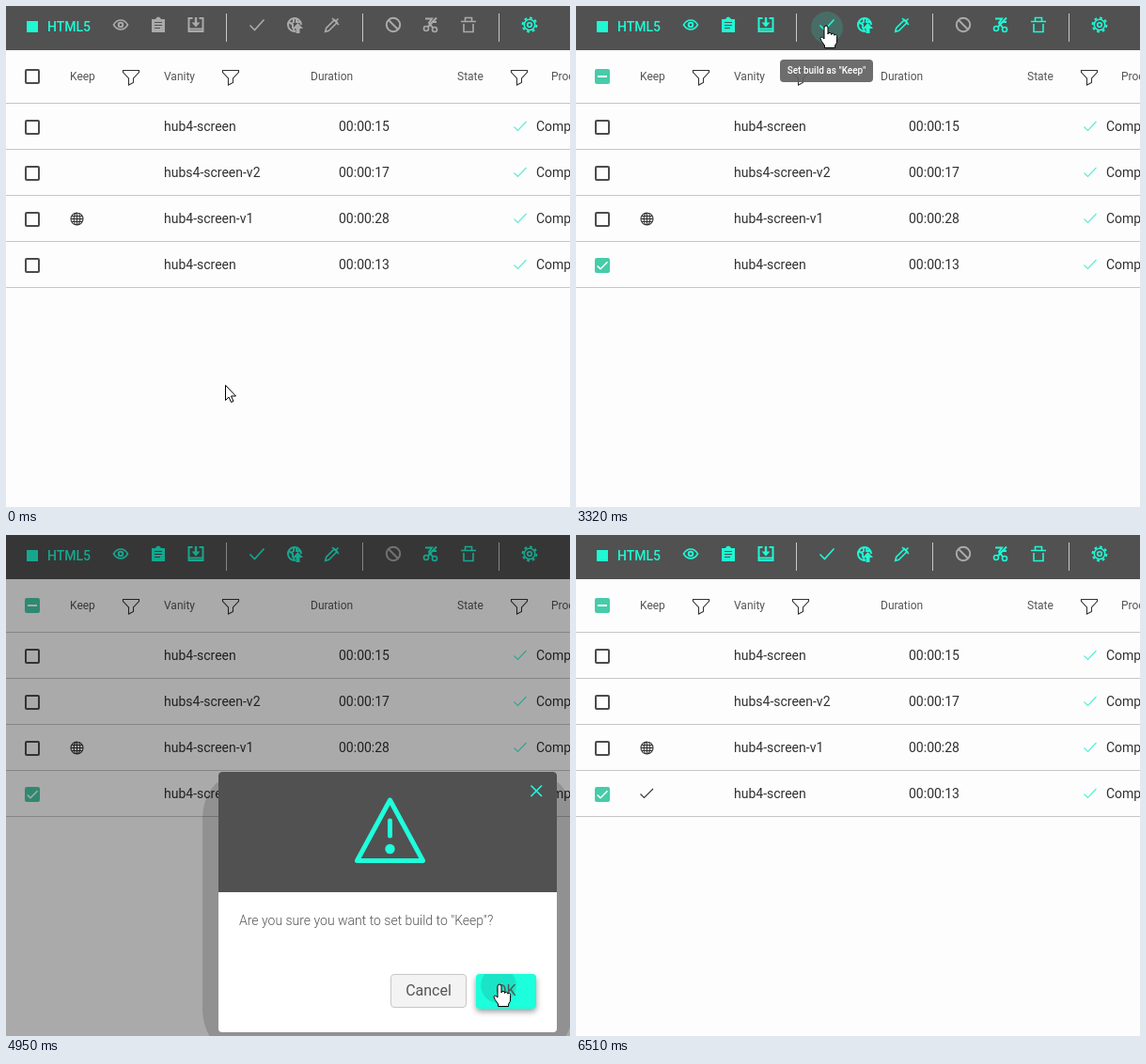
Write an HTML page that moves like this. It is 600 px wide and 533 px high and loops after 6.81 s.

```html
<!DOCTYPE html>
<html lang="en">
<head>
<meta charset="utf-8">
<title>Build list</title>
<style>
  html, body { margin: 0; width: 100%; height: 100%; overflow: hidden; background: #fdfdfd; }
  svg { display: block; font-family: Roboto, Arial, sans-serif; --teal: #1ff8d4; --tool: #aaa; }
  .icon { color: var(--teal); }
  .tool { color: var(--tool); }
  .off { color: #aaa; }
  .icon path, .icon circle { fill: none; stroke: currentColor; stroke-width: 2; }
  .icon .solid { fill: currentColor; stroke: none; }
  .icon .fine { stroke-width: 1.6; }
  .icon .bold { stroke-width: 5; stroke-linejoin: round; stroke-linecap: round; }
  .head { font-size: 12px; fill: #555; }
  .cell { font-size: 14px; fill: #303030; }
  .box { fill: #fff0; stroke: #4c4c4c; stroke-width: 2; }
  .hover { fill: #cdf4ec; stroke: #4b6862; }
  .checked { fill: #46cca8; stroke: #46cca8; }
  .thin { fill: none; stroke: #333; stroke-width: 1.1; }
  .rule { stroke: #c6c6c6; }
  .button { font-size: 16px; fill: #555; text-anchor: middle; }
</style>
</head>
<body>
<svg id="stage" width="600" height="533" viewBox="0 0 600 533">
  <rect width="600" height="533" fill="#fdfdfd"/>
  <rect width="600" height="47" fill="#515151"/>
  <path d="M234.5 8V38M379.5 8V38M524.5 8V38" stroke="#c8c8c8"/>
  <circle id="ripple" cx="267" cy="23" fill="#1ff8d4" opacity=".17"/>

  <rect x="22" y="16" width="12" height="12" fill="var(--teal)"/>
  <text x="44" y="27" font-size="14" font-weight="500" fill="var(--teal)">HTML5</text>

  <g class="icon tool">
    <g transform="translate(122 20)">
      <path class="fine" d="M-7.5 0Q-4.5 -5 0 -5T7.5 0Q4.5 5 0 5T-7.5 0Z"/>
      <circle r="2.3"/>
    </g>
    <path class="solid" transform="translate(162 20)" fill-rule="evenodd"
      d="M-7 -6H-3Q-2 -8.5 0 -8.5T3 -6H7V8H-7ZM-4 -3V-2H4V-3ZM-4 0V1H4V0ZM-4 3V4H2V3Z"/>
    <g transform="translate(202 20)">
      <path d="M-3.5 -7H-7.5V7H7.5V-7H3.5M-7 4.5H7"/>
      <path class="solid" d="M-1.2 -8H1.2V-2.5H4.5L0 2.5L-4.5 -2.5H-1.2Z"/>
    </g>
    <path class="fine" d="M259.5 20.5L264.5 25.5L274.5 14.5"/>
    <g transform="translate(307 20)">
      <path d="M1 7A7 7 0 1 1 7 0M-6 -3L-2 0V3L0 6M-1 -6V-3L-4 -1M2 -6V-3H6"/>
      <path class="solid" d="M3.5 -2L9 4H5.5V9H1.5V4H-2Z"/>
    </g>
    <path class="fine" transform="translate(347 20)"
      d="M-7.3 7.3L-6.3 3.5L2.5 -5.3L5.3 -2.5L-3.5 6.3ZM0 -7L7 0M4 -4L6.5 -6.5"/>
    <g transform="translate(451 20)">
      <circle class="fine" cx="-4" cy="4" r="2.5"/>
      <circle class="fine" cx="5" cy="5" r="2.5"/>
      <path d="M7 -7.5L-2 2M-5 -6.5H2L-1 -2L3 3M2 -3H7"/>
    </g>
    <path class="fine" transform="translate(492 20)"
      d="M-8 -3.5H8M-3.5 -4V-7.5H3.5V-4M-5 -1V7.5H5V-1"/>
  </g>
  <g class="icon off" transform="translate(412 20)">
    <circle r="7.2"/><path d="M-5 -5L5 5"/>
  </g>
  <g class="icon" transform="translate(557 20)">
    <circle class="fine" r="5.7"/>
    <circle r="7.4" pathLength="16" stroke-dasharray="1"/>
    <circle class="fine" r="2.3"/>
  </g>

  <g id="heads"></g>
  <path class="rule" d="M0 103.5H600"/>
  <rect class="box" id="allBox" x="21" y="68" width="14" height="14" rx="1"/>
  <path id="allBar" d="M23 75H33" stroke="#fff" stroke-width="2"/>
  <g id="rows"></g>
  <path class="thin" transform="translate(75.5 226.5)"
    d="M0 -6.5A6.5 6.5 0 0 1 0 6.5A6.5 6.5 0 0 1 0 -6.5A3.3 6.5 0 0 1 0 6.5A3.3 6.5 0 0 1 0 -6.5V6.5M-6.5 0H6.5M-5.5 -3H5.5M-5.5 3H5.5"/>
  <path id="tick" d="M22.7 276.5L26 279.7L33.5 272.2" fill="none" stroke="#fff" stroke-width="1.5"/>
  <path id="kept" class="thin" d="M68.5 275.5L72.5 279.5L82 270"/>

  <g id="tip">
    <rect x="217" y="57" width="99" height="24" rx="4" fill="#616161" fill-opacity=".92"/>
    <text x="266.5" y="72" font-size="10" font-weight="500" fill="#fff" text-anchor="middle">Set build as "Keep"</text>
  </g>

  <rect id="dim" width="600" height="533"/>
  <g id="dialog">
    <rect id="shade" y="258" height="290" rx="30" ry="44" fill-opacity=".15"/>
    <rect x="226" y="252" width="360" height="277" rx="4" fill="#fff"/>
    <path d="M226 380V256Q226 252 230 252H582Q586 252 586 256V380Z" fill="#515151"/>
    <g class="icon" style="--teal:#1fffdc">
      <path class="fine" d="M558.5 266.5L570 278M570 266.5L558.5 278"/>
      <path class="bold" d="M408.5 282L443.5 346.5H373.5ZM408.5 304V320"/>
      <circle class="solid" cx="408.5" cy="334" r="5.2"/>
    </g>
    <text x="248" y="415" font-size="14" font-weight="300" fill="#555">Are you sure you want to set build to "Keep"?</text>
    <rect id="cancel" x="409.5" y="467.5" width="80" height="35" rx="3.5" stroke="#c8c8c8"/>
    <text class="button" x="449.5" y="490">Cancel</text>
    <rect id="ok" x="500" y="467" width="64" height="37" rx="4"/>
    <clipPath id="okClip"><rect x="500" y="467" width="64" height="37" rx="4"/></clipPath>
    <circle id="okRipple" cx="524" cy="479" r="19" fill-opacity=".1" clip-path="url(#okClip)"/>
    <text class="button" x="532" y="490">OK</text>
  </g>

  <g id="cursor" fill="#fff" stroke="#000" stroke-linejoin="round">
    <path id="arrow" d="M.5 .5V16.5L4 13L6.5 18.5L9 17.5L6.5 12H11.5Z"/>
    <path id="hand" d="M-2 14V2a2 2 0 0 1 4 0V9q0-2 2-1.6t1.6 2.1q0-1.6 1.8-1.2t1.6 2q0-1.3 1.5-.8t1.1 2.2V16q0 3-2 5v2.5H-1.5V21Q-5.5 16-6 13.5q.5-3 4 .5z"/>
  </g>
</svg>
<script>
const LOOP = 6810;
const $ = id => document.getElementById(id);
const show = (id, on) => $(id).style.display = on ? "" : "none";
const set = (id, attrs) => Object.entries(attrs).forEach(([k, v]) => $(id).setAttribute(k, v));

const heads = { Keep: 68, Vanity: 168, Duration: 324, State: 480, Processing: 580 };
const funnel = x => `<path class="thin" transform="translate(${x} 76)"
  d="M-8.5 -7.5H8.5V-5.5L2.5 1V5.5L-2.5 8V1L-8.5 -5.5Z"/>`;
$("heads").innerHTML = Object.entries(heads)
  .map(([label, x]) => `<text class="head" x="${x}" y="79">${label}</text>`)
  .concat([133, 239, 546].map(funnel)).join("");

const builds = [["hub4-screen", 15], ["hubs4-screen-v2", 17], ["hub4-screen-v1", 28], ["hub4-screen", 13]];
$("rows").innerHTML = builds.map(([name, secs], i) => `
  <g transform="translate(0 ${i * 49})">
    <rect class="box" id="box${i}" x="21" y="122" width="14" height="14" rx="1"/>
    <text class="cell" x="168" y="133">${name}</text>
    <text class="cell" x="354" y="133">00:00:${secs}</text>
    <path class="thin" d="M540.5 128.5L544.5 132.5L553.5 123" style="stroke:#54eed4"/>
    <text class="cell" x="564" y="133">Completed</text>
    <path class="rule" d="M0 152.5H600"/>
  </g>`).join("");

// Pointer strokes: first and last step in ms, then the point reached.
const strokes = [
  [380, 660, 137, 342], [800, 1280, 34, 274], [2100, 2220, 95, 251], [2360, 2890, 266, 21],
  [4040, 4400, 474, 440], [4550, 4800, 525, 478], [6120, 6360, 577, 524]
];

// The pointer advances in even steps of about 125 ms.
function pointer(t) {
  let x = 233, y = 403;
  for (const [first, last, toX, toY] of strokes) {
    if (t < first) break;
    const gaps = Math.round((last - first) / 125);
    const step = Math.min(gaps, Math.floor((t - first) / (last - first) * gaps));
    const p = (step + 1) / (gaps + 1);
    x += (toX - x) * p;
    y += (toY - y) * p;
  }
  return [x, y];
}

const within = (t, a, b) => t >= a && t < b;

// Approaches `to` in hard steps of 150 ms.
const settle = (t, start, from, to) => to + (from - to) * .15 ** Math.max(0, Math.floor((t - start) / 150));

function draw(t) {
  const picked = t >= 1580, checked = t >= 1700, pressed = t >= 4950;
  const open = within(t, 3470, 5100);
  const hand = within(t, 1280, 2100) || within(t, 2730, 3470) || within(t, 4800, 5100);

  set("cursor", { transform: `translate(${pointer(t)})` });
  show("cursor", t < 6510);
  show("hand", hand);
  show("arrow", !hand);

  $("stage").style.setProperty("--tool", picked ? "var(--teal)" : "#aaa");
  set("box3", { class: "box " + (checked ? "checked" : picked ? "hover" : "") });
  set("allBox", { class: "box " + (checked ? "checked" : "") });
  show("allBar", checked);
  show("tick", checked);
  set("tick", { "stroke-dasharray": `${t < 1850 ? 8 : 20} 40` });
  show("kept", t >= 5530);

  show("ripple", within(t, 3320, 3620) || within(t, 5100, 5380));
  set("ripple", { r: settle(t, 3320, 17, 20) });
  show("tip", within(t, 2730, 3470));
  set("tip", { opacity: settle(t, 2730, .4, 1) });

  show("dim", t >= 3470);
  set("dim", { opacity: open ? settle(t, 3470, .295, .33) : settle(t, 5100, .12, 0) });
  show("dialog", open);
  const spread = settle(t, 3470, 6, 17);
  set("shade", { x: 226 - spread, width: 360 + 2 * spread });
  set("cancel", { fill: pressed ? "#f3f3f3" : "#fff" });
  set("ok", { fill: pressed ? "#1cffdc" : "#36ffe0" });
  $("ok").style.filter = `drop-shadow(0 ${pressed ? 3 : 1}px ${pressed ? 3 : 1.5}px #0006)`;
  show("okRipple", pressed);
}

const start = performance.now();
function frame() {
  draw((performance.now() - start) % LOOP);
  requestAnimationFrame(frame);
}
frame();
</script>
</body>
</html>
```
